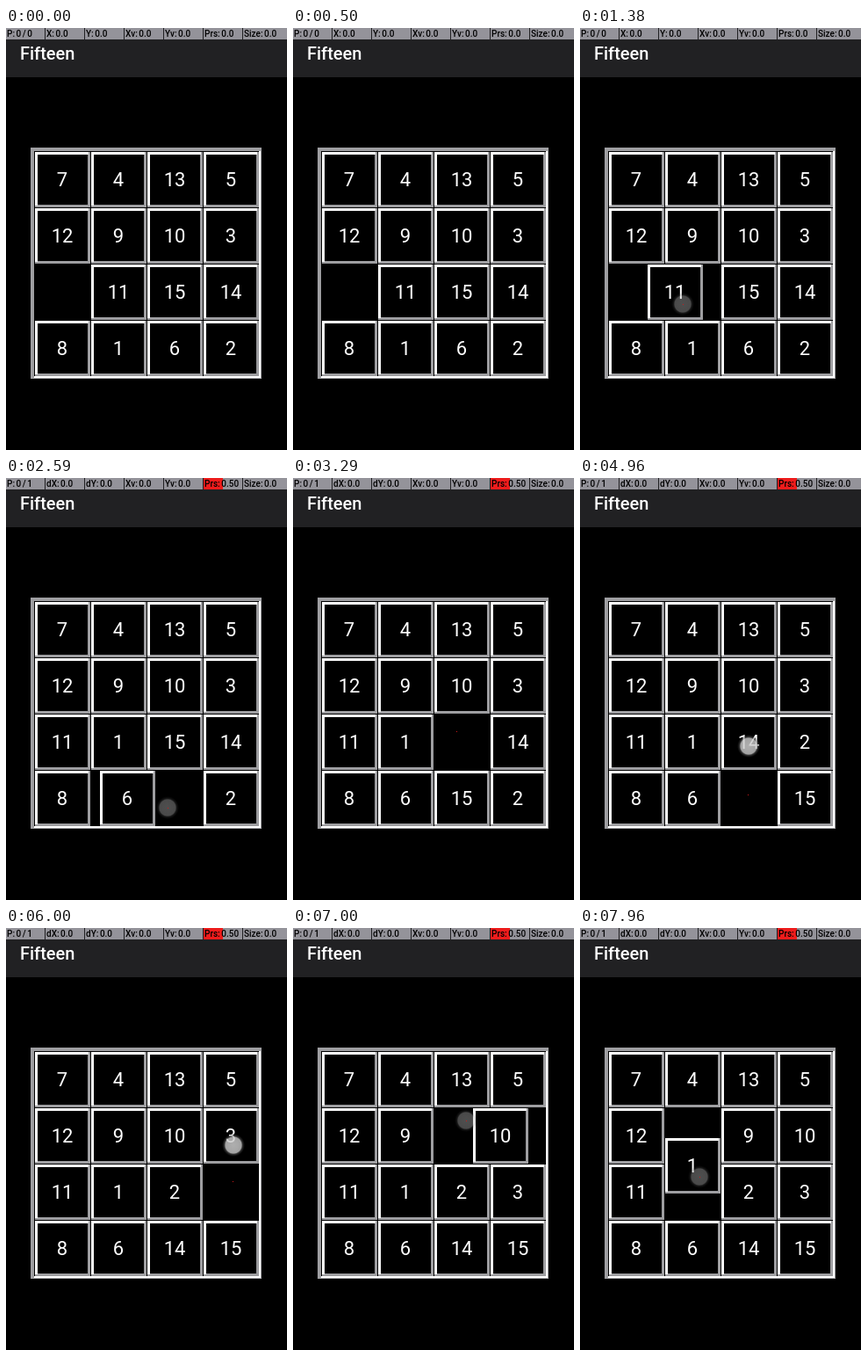
An HTML page with a canvas for the animation above (8 s loop, 320 by 480 pixels).

```html
<!DOCTYPE html>
<html lang="en">
<head>
<meta charset="utf-8">
<title>Fifteen</title>
<style>
  html, body { margin: 0; width: 100%; height: 100%; overflow: hidden; background: #000; }
  canvas { display: block; width: 320px; height: 480px; }
</style>
</head>
<body>
<canvas id="stage" width="320" height="480"></canvas>
<script>
const ctx = document.getElementById('stage').getContext('2d');
const LOOP = 8000, CELL = 64, LEFT = 32, TOP = 140;
const SLIDE_DELAY = 140, SLIDE_TIME = 160, TOUCH_TIME = 330;
const WHITE = '#fff', GREY = '#9e9ea1', BAR = '#94939a', HEADER = '#212123';

const START = [7, 4, 13, 5, 12, 9, 10, 3, 0, 11, 15, 14, 8, 1, 6, 2];

// Each letter is the way a tile slides into the gap: left, right, up, down.
const MOVES = 'LULDLURDLDRRU';
const TAP_TIMES = [1192, 2040, 2316, 2880, 3460, 3812, 4260, 4960, 5540, 6000, 6750, 7040, 7745];
const STEP = { L: -1, R: 1, U: -4, D: 4 };

const clamp = v => Math.max(0, Math.min(1, v));
const cellX = i => LEFT + (i % 4) * CELL;
const cellY = i => TOP + Math.floor(i / 4) * CELL;

// The finger lands near a tile's centre, drifting right and swaying up and down.
const fingerX = (cell, i) => Math.round(cellX(cell) + 21 + 1.6 * i);
const fingerY = (cell, i) => Math.round(cellY(cell) + 30 - 16 * Math.cos((i - 5.5) * Math.PI / 1.1));

function rect(color, x, y, w, h) {
  ctx.fillStyle = color;
  ctx.fillRect(x, y, w, h);
}

function text(str, x, y, font, color, align = 'left') {
  ctx.font = font + ' Roboto, sans-serif';
  ctx.fillStyle = color;
  ctx.textAlign = align;
  ctx.fillText(str, x, y);
}

function drawHeader(touched) {
  rect(HEADER, 0, 0, 320, 56);
  text('Fifteen', 16, 36, '500 20px', WHITE);
  const d = touched ? 'd' : '';
  const labels = [
    touched ? 'P: 0 / 1' : 'P: 0 / 0', d + 'X: 0.0', d + 'Y: 0.0',
    'Xv: 0.0', 'Yv: 0.0', touched ? 'Prs: 0.50' : 'Prs: 0.0', 'Size: 0.0'
  ];
  ctx.wordSpacing = '-1px';
  labels.forEach((label, i) => {
    const x = i * 45;
    rect(BAR, x, 0, i < 6 ? 44 : 50, 13);
    if (i === 5 && touched) rect('#ee1c1c', x, 0, 22, 13);
    text(label, x + 1, 10, '500 10px', '#000');
  });
  ctx.wordSpacing = '0px';
}

// Sunken frame: shaded at the top left, lit at the bottom right.
function drawFrame() {
  rect(GREY, 28, 136, 263, 263);
  rect(WHITE, 32, 140, 258, 258);
  rect('#000', 32, 140, 256, 256);
}

function drawTile(n, x, y) {
  rect(GREY, x + 1, y + 1, 63, 63);
  rect(WHITE, x + 1, y + 1, 61, 3);
  rect(WHITE, x + 1, y + 1, 3, 61);
  rect('#000', x + 4, y + 4, 57, 57);
  text(n, x + 32, y + 40, '22px', WHITE, 'center');
}

function drawTouch(x, y, age) {
  const release = 1 - 0.55 * clamp((age - 80) / 50);
  const fade = clamp((TOUCH_TIME - age) / 40);
  const glow = ctx.createRadialGradient(x, y, 0, x, y, 13);
  glow.addColorStop(0, 'rgba(205,205,205,.85)');
  glow.addColorStop(0.7, 'rgba(205,205,205,.8)');
  glow.addColorStop(0.8, 'rgba(100,100,100,.5)');
  glow.addColorStop(1, 'rgba(60,60,60,0)');
  ctx.globalAlpha = release * fade;
  ctx.fillStyle = glow;
  ctx.fillRect(x - 13, y - 13, 26, 26);
  ctx.globalAlpha = 1;
}

function draw(t) {
  const board = START.slice();
  let moving = null, touch = null, dot = null;

  TAP_TIMES.forEach((at, i) => {
    const age = t - at;
    if (age < 0) return;
    const to = board.indexOf(0), from = to - STEP[MOVES[i]];
    const x = fingerX(from, i), y = fingerY(from, i);
    if (age < TOUCH_TIME) touch = [x, y, age];
    if (age >= 80) dot = [x, y];
    const p = clamp((age - SLIDE_DELAY) / SLIDE_TIME);
    if (p === 0) return;
    board[to] = board[from];
    board[from] = 0;
    moving = { from, to, p };
  });

  rect('#000', 0, 0, 320, 480);
  drawHeader(t >= TAP_TIMES[0] + 230);
  drawFrame();
  board.forEach((n, i) => {
    if (n && !(moving && moving.to === i)) drawTile(n, cellX(i), cellY(i));
  });
  if (moving) {
    const { from, to, p } = moving;
    const mix = pos => Math.round(pos(from) + (pos(to) - pos(from)) * p);
    drawTile(board[to], mix(cellX), mix(cellY));
  }
  if (touch) drawTouch(...touch);
  if (dot) rect('#d01818', dot[0], dot[1], 1, 1);
}

const origin = performance.now();
function tick() {
  draw((performance.now() - origin) % LOOP);
  requestAnimationFrame(tick);
}
tick();
</script>
</body>
</html>
```
